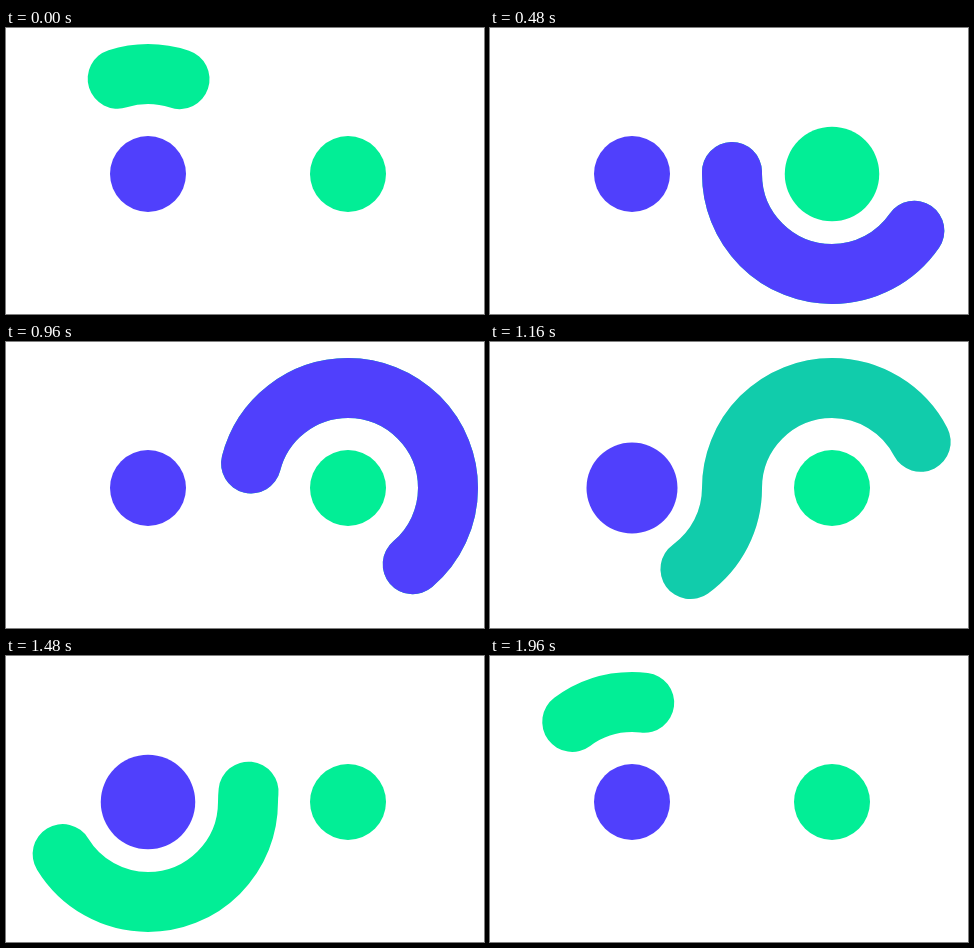
Animation, 478 px wide and 286 px high, one loop 2000 ms. Source, as an HTML page:

```html
<!DOCTYPE html>
<html lang="en">
<head>
<meta charset="utf-8">
<title>Loop</title>
<style>
  html, body { margin: 0; width: 100%; height: 100%; overflow: hidden; background: #fff; }
  svg { display: block; width: 478px; height: 286px; }
  .trail { fill: none; stroke-width: 60; stroke-linecap: round; }
</style>
</head>
<body>
<svg viewBox="0 0 478 286">
  <path class="trail" stroke="#02ee96"/>
  <path class="trail" stroke="#5040fc" id="blueTrail"/>
  <circle id="leftBall" cx="142" cy="146" r="38" fill="#5040fc"/>
  <circle id="rightBall" cx="342" cy="146" r="38" fill="#02ee96"/>
</svg>
<script>
const LOOP = 2000, HALF = LOOP / 2;
const FADE = 200, PULSE = 2000 / 3, REST = 38, SWELL = 15.8;
const MIN_LENGTH = 36, STRETCH = 180;

const trails = document.querySelectorAll('.trail');
const blueTrail = document.getElementById('blueTrail');
const leftBall = document.getElementById('leftBall');
const rightBall = document.getElementById('rightBall');

// Left circle, right circle, left circle again: one unit of length per degree.
const leftTurn = 'a100 100 0 0 1 -200 0a100 100 0 0 1 200 0';
const rightTurn = 'a100 100 0 0 0 200 0a100 100 0 0 0 -200 0';
for (const trail of trails) {
  trail.setAttribute('d', 'M242 146' + leftTurn + rightTurn + leftTurn);
  trail.setAttribute('pathLength', 1080);
}

const clamp = x => Math.min(1, Math.max(0, x));
const smooth = x => x * x * (3 - 2 * x);

function bezier(x, x1, y1, x2, y2) {
  const at = (s, a, b) => 3 * (1 - s) ** 2 * s * a + 3 * (1 - s) * s * s * b + s ** 3;
  let low = 0, high = 1;
  for (let i = 0; i < 24; i++) {
    const mid = (low + high) / 2;
    if (at(mid, x1, x2) < x) low = mid; else high = mid;
  }
  return at(low, y1, y2);
}

// Rises from 0 to 1 in the first half of the loop and falls back in the second.
const stretchAt = t =>
  bezier(1 - Math.abs(t / HALF - 1), 1 / 6, 1 / 6, 2 / 3, 1);

function radiusAt(t) {
  const x = clamp(t / PULSE);
  return REST + SWELL * smooth(1 - Math.abs(2 * x - 1));
}

function render(t) {
  const extra = STRETCH * stretchAt(t);
  const center = 360 * t / HALF - 90;
  const tail = center - MIN_LENGTH / 2 - 0.6 * extra;
  for (const trail of trails) {
    trail.setAttribute('stroke-dasharray', `${MIN_LENGTH + extra} 3000`);
    trail.setAttribute('stroke-dashoffset', -(tail + 360));
  }
  blueTrail.setAttribute('opacity', clamp(t / FADE) - clamp((t - HALF) / FADE));
  rightBall.setAttribute('r', radiusAt(t));
  leftBall.setAttribute('r', radiusAt((t + HALF) % LOOP));
}

const start = performance.now();
function tick(now) {
  render(Math.max(0, now - start) % LOOP);
  requestAnimationFrame(tick);
}
render(0);
requestAnimationFrame(tick);
</script>
</body>
</html>
```
